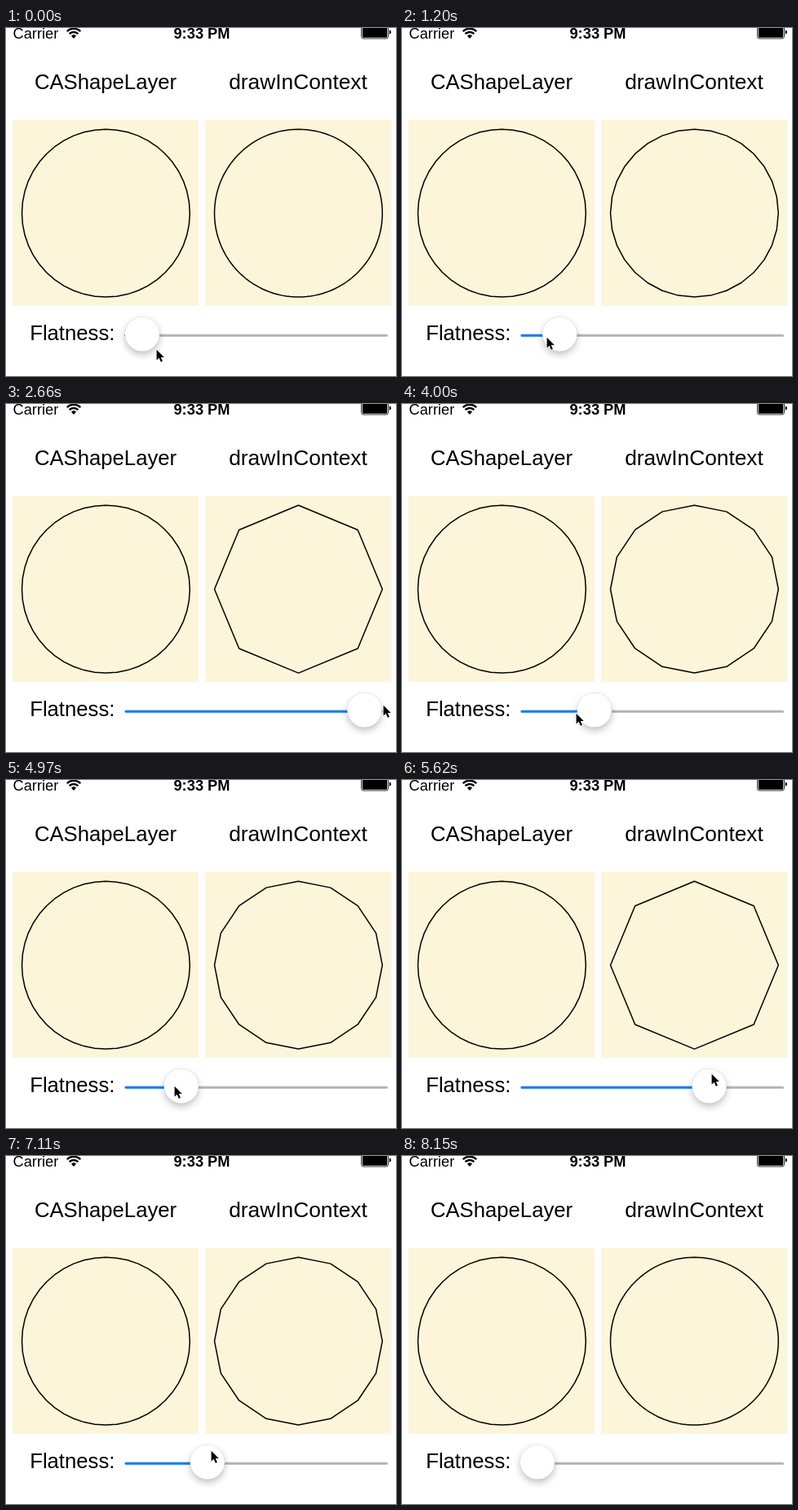
An HTML page that plays this animation: 478 px wide and 427 px high, repeating every 8.76 s.

```html
<!DOCTYPE html>
<html lang="en">
<head>
<meta charset="utf-8">
<title>Flatness slider</title>
<style>
  html, body { margin: 0; width: 100%; height: 100%; overflow: hidden; background: #fff; }
  svg { display: block; width: 478px; height: 427px; font-family: "Liberation Sans", Arial, sans-serif; }
  .title { font-size: 25.7px; }
  .status { font-size: 18.3px; }
  .middle { text-anchor: middle; }
  .card { fill: #fdf5da; }
  .outline { fill: none; stroke: #000; stroke-width: 1.5; stroke-linejoin: round; }
  .thumb { fill: #fff; filter: drop-shadow(0 0 .7px rgba(0,0,0,.35)) drop-shadow(0 4px 4px rgba(0,0,0,.24)); }
</style>
</head>
<body>
<svg viewBox="0 0 478 427">
  <text class="status" x="8.5" y="13">Carrier</text>
  <g fill="none" stroke="#000" stroke-width="2.4">
    <path d="M74.7 4.2a11.7 11.7 0 0 1 16.6 0M77.6 7.2a7.6 7.6 0 0 1 10.8 0"/>
    <path d="M83 13l-3-3.2a4.3 4.3 0 0 1 6 0z" fill="#000" stroke="none"/>
  </g>
  <text class="status middle" x="240" y="13" font-weight="bold">9:33 PM</text>
  <rect x="435.5" y="-3" width="33" height="16" rx="2.5" fill="none" stroke="#000" stroke-width=".8"/>
  <rect x="436.8" y="-2" width="30.4" height="13.7" rx="1.2"/>
  <path d="M469.8 2.2q2.2 .6 2.2 2.8t-2.2 2.8z"/>

  <text class="title middle" x="122" y="75" font-size="25.4">CAShapeLayer</text>
  <text class="middle" x="358" y="75" font-size="26.3">drawInContext</text>
  <rect class="card" x="7.7" y="112.6" width="228.3" height="228.4"/>
  <rect class="card" x="244.1" y="112.6" width="228.4" height="228.4"/>
  <polygon class="outline" id="layerShape"/>
  <polygon class="outline" id="contextShape"/>

  <text class="title" x="29.2" y="383">Flatness:</text>
  <g stroke-width="3" stroke-linecap="round">
    <path d="M147 377.3H466.5" stroke="#b4b4b4"/>
    <path id="fill" stroke="#1581fb"/>
  </g>
  <circle class="thumb" id="thumb" cy="375.6" r="21.2"/>
  <path id="cursor" d="M.6 .8V13.4L3.6 10.7L5.8 15.8L7.9 14.9L5.8 10H9.8Z" stroke="#fff" stroke-width="1.6" paint-order="stroke"/>
</svg>
<script>
  const LOOP = 8760, MIN = 166, MAX = 446, RADIUS = 102.9;

  // Each move glides to a place, which is then held until the next move.
  const move = (begin, end, x, y = 0) => ({ begin, end, x, y });

  const thumbMoves = [
    move(0, 0, MIN + 1),
    move(840, 870, 183),
    move(1140, 2700, MAX),
    move(3040, 4320, MIN),
    move(4775, 5900, MAX),
    move(6300, 7440, MIN)
  ];
  const cursorMoves = [
    move(0, 0, 184, 394),
    move(260, 690, 165, 381),
    move(1140, 1880, 311, 360),
    move(1880, 2700, 470, 369),
    move(2900, 4350, 131, 382),
    move(4690, 5950, 466, 352),
    move(6270, 7600, 126, 367),
    move(7900, 8140, 330, 430)
  ];

  const byId = id => document.getElementById(id);
  const thumb = byId("thumb"), fill = byId("fill"), cursor = byId("cursor");

  function placeAt(moves, time) {
    let { x, y } = moves[0];
    for (const { begin, end, x: toX, y: toY } of moves.slice(1)) {
      const part = Math.min(1, Math.max(0, (time - begin) / (end - begin)));
      x += (toX - x) * part;
      y += (toY - y) * part;
    }
    return { x, y };
  }

  function drawRound(shape, cx, sides) {
    const points = Array.from({ length: sides }, (_, i) => {
      const angle = i / sides * 2 * Math.PI;
      return `${(cx + RADIUS * Math.cos(angle)).toFixed(2)},${(227.2 + RADIUS * Math.sin(angle)).toFixed(2)}`;
    });
    shape.setAttribute("points", points.join(" "));
  }

  // Doubling the sides quarters the deviation from the true circle.
  function sidesFor(flatness) {
    let sides = 8;
    for (let limit = 156; flatness < limit && sides < 128; limit /= 4) sides *= 2;
    return sides;
  }

  function render(time) {
    const { x } = placeAt(thumbMoves, time);
    thumb.setAttribute("cx", x);
    fill.setAttribute("d", `M147 377.3H${x}`);
    drawRound(byId("contextShape"), 358.4, sidesFor(x - MIN));

    const tip = placeAt(cursorMoves, time);
    cursor.setAttribute("transform", `translate(${Math.round(tip.x)} ${Math.round(tip.y)})`);
  }

  drawRound(byId("layerShape"), 122.4, 48);
  const start = performance.now();
  function tick() {
    render((performance.now() - start) % LOOP);
    requestAnimationFrame(tick);
  }
  tick();
</script>
</body>
</html>
```
